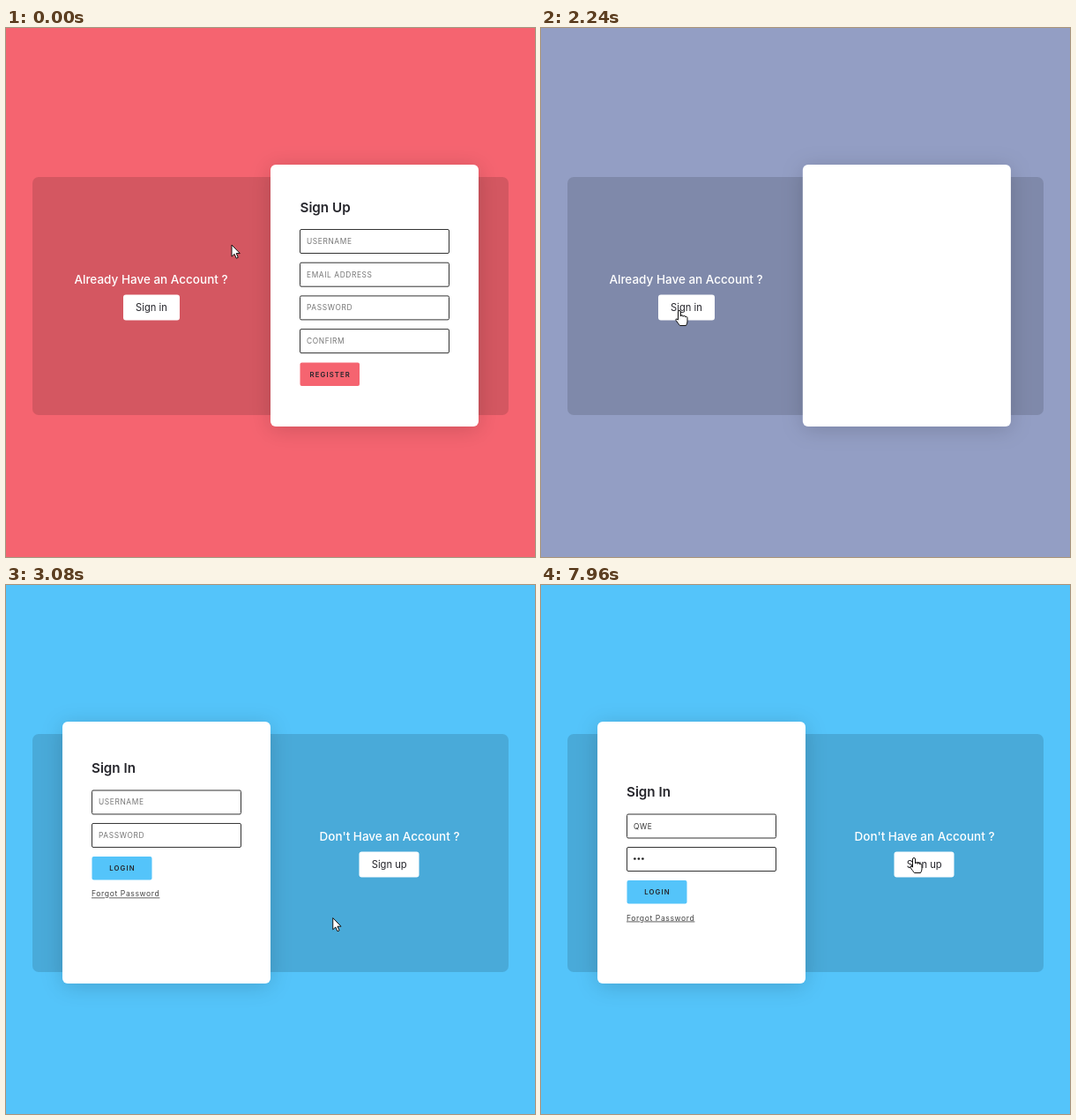
An HTML page for the animation above (8 s loop, 600 by 600 pixels).

```html
<!DOCTYPE html>
<html lang="en">
<head>
<meta charset="utf-8">
<title>Sign in / sign up</title>
<style>
  html, body { margin: 0; width: 100%; height: 100%; overflow: hidden; }
  svg { display: block; width: 100vw; height: 100vh; }
  text { font-family: Inter, "Open Sans", sans-serif; fill: #25252b; }
  .prompt { font-size: 13.5px; font-weight: 500; fill: #fff; text-anchor: middle; }
  .choice { font-size: 11.2px; text-anchor: middle; }
  .title { font-size: 15.2px; font-weight: 600; }
  .label { font-size: 8.4px; letter-spacing: .6px; fill: #757575; }
  .value { font-size: 8.4px; letter-spacing: .6px; fill: #333; }
  .action { font-size: 7.7px; font-weight: 600; letter-spacing: 1.15px; }
  .link { font-size: 8.6px; letter-spacing: .6px; fill: #444; text-decoration: underline; }
  .field { fill: #fff; stroke: #333; }
  .pointer { fill: #fff; stroke: #111; stroke-linejoin: round; }
</style>
</head>
<body>
<svg viewBox="0 0 600 600">
  <defs>
    <filter id="shadow" x="-30%" y="-30%" width="160%" height="160%">
      <feDropShadow dx="0" dy="3.4" stdDeviation="12" flood-color="#000" flood-opacity=".16"/>
    </filter>
    <clipPath id="cardClip"><rect width="236" height="297" rx="6"/></clipPath>
  </defs>
  <rect id="page" width="600" height="600"/>
  <rect x="30" y="169" width="540" height="270" rx="7" opacity=".135"/>

  <text class="prompt" x="164.5" y="290">Already Have an Account ?</text>
  <rect x="133" y="302.5" width="64" height="29" rx="3" fill="#fff"/>
  <text class="choice" x="165" y="320.5">Sign in</text>
  <text class="prompt" x="435" y="290">Don't Have an Account ?</text>
  <rect x="400.5" y="302.5" width="68" height="29" rx="3" fill="#fff"/>
  <text class="choice" x="434.7" y="320.5">Sign up</text>

  <g id="card">
    <rect width="236" height="297" rx="6" fill="#fff" filter="url(#shadow)"/>
    <g clip-path="url(#cardClip)">
      <g id="signUp"></g>
      <g id="signIn"></g>
    </g>
  </g>

  <circle id="ripple" fill="#d8354a"/>
  <path id="arrow" class="pointer" d="M0 0V13.2L3.1 10.4 5.2 15.2 7.3 14.3 5.2 9.6H9.3Z"/>
  <path id="hand" class="pointer" d="M-1.5 10V1a1.5 1.5 0 0 1 3 0V6a1.3 1.3 0 0 1 2.7 .4a1.3 1.3 0 0 1 2.6 .6a1.2 1.2 0 0 1 2.2 .8V12Q9 14 7.5 16.5H.5Q-1.5 14-4 10.5Q-4.5 8.5-3 9Z"/>
  <path id="beam" d="M-2.5-5.5H-1Q0-5.5 0-4.5Q0-5.5 1-5.5H2.5M0-5V5M-2.5 5.5H-1Q0 5.5 0 4.5Q0 5.5 1 5.5H2.5" fill="none" stroke="#222"/>
</svg>
<script>
const LOOP = 8000;
const RED = [245, 100, 112], BLUE = [84, 196, 250];
const USER = 'QWE';
const $ = id => document.getElementById(id);
const rgb = c => `rgb(${c.map(Math.round)})`;

// Form contents, in card coordinates
const field = (y, label) =>
  `<rect class="field" x="33.5" y="${y}" width="169" height="27" rx="1.5"/>
   <text class="label" x="41" y="${y + 16.5}">${label}</text>`;
const action = (y, width, label, color) =>
  `<rect x="33.5" y="${y}" width="${width}" height="26.5" rx="2" fill="${rgb(color)}"/>
   <text class="action" x="${33.5 + width / 2 + .5}" y="${y + 16}" text-anchor="middle">${label}</text>`;
const caretLine = id => `<path id="${id}" d="M0 0v12" stroke="#111"/>`;

$('signUp').innerHTML = '<text class="title" x="33.5" y="54">Sign Up</text>' +
  ['USERNAME', 'EMAIL ADDRESS', 'PASSWORD', 'CONFIRM'].map((s, i) => field(73.5 + i * 37.7, s)).join('') +
  action(224.5, 67.5, 'REGISTER', RED) + caretLine('confirmCaret');

$('signIn').innerHTML = '<text class="title" x="33" y="85">Sign In</text>' +
  field(105, 'USERNAME') + field(142.5, 'PASSWORD') +
  '<text id="user" class="value" x="41" y="121.5"></text>' +
  [0, 1, 2].map(i => `<circle class="dot" cx="${42.4 + i * 4.5}" cy="155.5" r="1.35" fill="#222"/>`).join('') +
  action(180, 68, 'LOGIN', BLUE) +
  '<text class="link" x="33" y="225.5">Forgot Password</text>' +
  caretLine('userCaret') + caretLine('passCaret');

const [userLabel, passLabel] = document.querySelectorAll('#signIn .label');
const dots = document.querySelectorAll('.dot');

const clamp = v => Math.min(1, Math.max(0, v));
const progress = (t, start, length) => clamp((t - start) / length);
const lerp = (a, b, p) => a + (b - a) * p;
const smooth = p => p * p * (3 - 2 * p);
const show = (el, on) => el.setAttribute('visibility', on ? 'inherit' : 'hidden');
const place = (el, x, y) => el.setAttribute('transform', `translate(${x} ${y})`);

// CSS "ease": cubic-bezier(.25, .1, .25, 1)
function ease(x) {
  let lo = 0, hi = 1;
  for (let i = 0; i < 24; i++) {
    const s = (lo + hi) / 2;
    if (.75 * s * (1 - s) + s ** 3 < x) lo = s; else hi = s;
  }
  return .3 * lo * (1 - lo) ** 2 + 3 * lo * lo * (1 - lo) + lo ** 3;
}

// Pointer moves: start, end, x, y at the end
const moves = [
  [0, 0, 256, 246], [40, 320, 160, 201], [640, 960, 157, 321],
  [2640, 3360, 478, 406], [3640, 4240, 219.5, 280],
  [5540, 5760, 211, 310], [6480, 6880, 431, 315], [7080, 7200, 423, 310]
];
const clicks = [1770, 4320, 5785];
const typedAt = [5240, 5360, 5480], dotsAt = [6120, 6220, 6310];
const count = (times, t) => times.filter(s => t >= s).length;

function pointerAt(t) {
  let x, y;
  for (const [start, end, toX, toY] of moves) {
    if (t < start) break;
    const p = end > start ? smooth(progress(t, start, end - start)) : 1;
    x = x === undefined ? toX : lerp(x, toX, p);
    y = y === undefined ? toY : lerp(y, toY, p);
  }
  return [x, y];
}

function pointerKind(x, y, cardX, t) {
  const inside = (l, top, w, h) => x >= l && x <= l + w && y >= top && y <= top + h;
  if (inside(cardX, 155, 236, 297)) {
    const ready = t > 3300;
    return ready && (inside(97, 260, 169, 27) || inside(97, 297, 169, 27)) ? 'beam' : 'arrow';
  }
  return inside(133, 302, 64, 29) || inside(400, 302, 68, 29) ? 'hand' : 'arrow';
}

function draw(t) {
  const tint = ease(progress(t, 1970, 770));
  $('page').setAttribute('fill', rgb(RED.map((c, i) => lerp(c, BLUE[i], tint))));

  const cardX = lerp(300, 64, ease(progress(t, 2222, 760)));
  place($('card'), cardX, 155);
  place($('signUp'), 0, 297 * ease(progress(t, 1970, 390)));
  place($('signIn'), 0, -297 * (1 - ease(progress(t, 2590, 770))));

  const letters = count(typedAt, t), stars = count(dotsAt, t);
  $('user').textContent = USER.slice(0, letters);
  show(userLabel, !letters);
  show(passLabel, !stars);
  dots.forEach((dot, i) => show(dot, i < stars));

  place($('confirmCaret'), 41.5, 194);
  show($('confirmCaret'), (t >= 240 && t < 780) || (t >= 1320 && t < 1860));
  place($('userCaret'), 41.5 + (letters ? $('user').getComputedTextLength() : 0), 112);
  show($('userCaret'), (t >= 4230 && t < 4760) || (t >= 5240 && t < 5785));
  place($('passCaret'), 41.5 + (stars ? stars * 4.5 - .5 : 0), 149.5);
  show($('passCaret'), (t >= 5785 && t < 6860) || (t >= 7400 && t < 7940));

  const [x, y] = pointerAt(t);
  const kind = pointerKind(x, y, cardX, t);
  for (const id of ['arrow', 'hand', 'beam']) {
    show($(id), id === kind);
    place($(id), x, y);
  }

  const click = clicks.find(s => t >= s && t < s + 440);
  show($('ripple'), click !== undefined);
  if (click !== undefined) {
    const p = (t - click) / 440;
    place($('ripple'), x, y);
    $('ripple').setAttribute('r', 18.5 * p);
    $('ripple').setAttribute('opacity', .8 * (1 - p ** 3));
  }
}

function tick() {
  draw(performance.now() % LOOP);
  requestAnimationFrame(tick);
}
tick();
</script>
</body>
</html>
```
